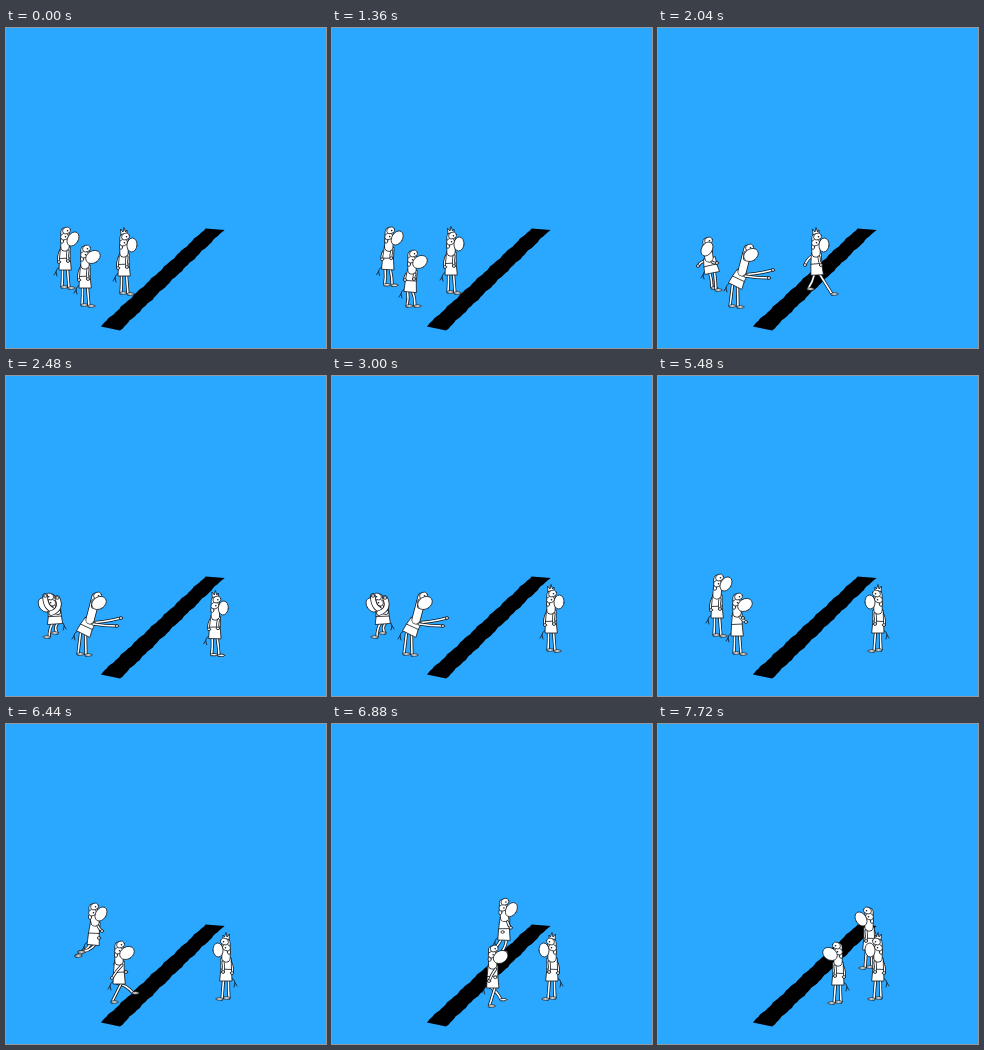
Recreate the animation shown at these times as an HTML page with a canvas. Size 320 by 320 pixels, loop 8 s.

```html
<!DOCTYPE html>
<html lang="en">
<head>
<meta charset="utf-8">
<title>Over the line</title>
<style>
html, body { margin: 0; width: 100%; height: 100%; overflow: hidden; background: #2aa7ff; }
canvas { display: block; width: 100vw; height: 100vh; }
</style>
</head>
<body>
<canvas id="stage"></canvas>
<script>
const LOOP = 8000, STEP = 40, INK = '#101418';
const canvas = document.getElementById('stage');
const ctx = canvas.getContext('2d');

// Joints facing right, relative to the ground point between the feet.
const stand = {
  nose: [8, -49], head: [0, -53], neck: [0, -41], hip: [0, -18],
  foot1: [-3, -1], foot2: [4, 0], hand1: [-6, -26], hand2: [3, -27]
};
const pose = (changes) => ({ ...stand, ...changes });
const POSES = {
  stand,
  fidget: pose({ hand1: [-6, -34] }),
  think: pose({ hand1: [6, -36], hand2: [9, -32] }),
  lookUp: pose({ nose: [9, -52], head: [1, -54] }),
  stepA: pose({ hip: [1, -19], foot1: [-8, -5], foot2: [16, 0], hand1: [-11, -29], hand2: [5, -29] }),
  stepB: pose({ foot1: [14, -9], foot2: [-7, 0], hand1: [7, -30], hand2: [-7, -24] }),
  dip: pose({ nose: [9, -44], head: [1, -48], neck: [1, -36], hip: [-1, -14], foot1: [-4, 0] }),
  lunge: {
    nose: [14, -52], head: [11, -55], neck: [5, -35], hip: [-2, -21],
    foot1: [-7, -1], foot2: [1, 0], hand1: [36, -37], hand2: [32, -29]
  },
  shock: {
    nose: [-1, -39], head: [-1, -43], neck: [1, -30], hip: [4, -15],
    foot1: [4, 0], foot2: [8, 2], hand1: [-10, -22], hand2: [9, -25]
  },
  cower: {
    nose: [8, -32], head: [1, -36], neck: [-2, -28], hip: [-3, -13],
    foot1: [-5, -4], foot2: [3, 0], hand1: [-5, -39], hand2: [7, -41]
  },
  leap: pose({
    nose: [7, -51], head: [-1, -54], neck: [1, -43], hip: [-1, -20],
    foot1: [-18, -9], foot2: [-15, -13], hand1: [5, -27], hand2: [8, -34]
  })
};

// Keys: time, x, ground, facing, pose
const ann = {
  nose: [5.3, 7.6, 0.55], blinks: [[4800, 4880], [5320, 5400]],
  keys: [
    [0, 59, 260, 1, 'stand'], [960, 59, 260, 1, 'stand'],
    [1280, 57, 260, 1, 'dip'], [1480, 55, 253, 1, 'lookUp'],
    [1760, 50, 260, 1, 'shock'], [2080, 50, 260, 1, 'shock'],
    [2240, 47, 261, -1, 'cower'], [2400, 45, 261, -1, 'cower'],
    [2600, 48, 261, -1, 'cower'], [4280, 48, 261, -1, 'cower'],
    [4400, 54, 260, 1, 'dip'], [4560, 59, 260, 1, 'stand'],
    [5160, 59, 260, 1, 'stand'], [5360, 59, 260, 1, 'lookUp'],
    [5640, 59, 260, 1, 'lookUp'], [5840, 59, 260, 1, 'stand'],
    [6000, 59, 260, 1, 'stand'], [6160, 59, 260, 1, 'dip'],
    [6280, 64, 255, 1, 'stand'], [6440, 88, 241, 1, 'leap'],
    [6640, 124, 234, 1, 'leap'], [6800, 156, 233, 1, 'leap'],
    [7000, 196, 240, 1, 'stepA'], [7120, 211, 246, 1, 'dip'],
    [7280, 211, 244, -1, 'stand'], [8000, 211, 244, -1, 'stand']
  ]
};
const ben = {
  nose: [6, 7.8, 1], blinks: [[4800, 4880], [5640, 5720]],
  keys: [
    [0, 79, 278, 1, 'stand'], [1120, 79, 278, 1, 'stand'],
    [1360, 79, 278, 1, 'dip'], [1640, 79, 279, 1, 'lunge'],
    [3440, 79, 279, 1, 'lunge'], [3640, 79, 278, 1, 'dip'],
    [3840, 79, 278, 1, 'stand'], [5160, 79, 278, 1, 'stand'],
    [5360, 79, 278, 1, 'think'], [5640, 79, 278, 1, 'think'],
    [5840, 79, 278, 1, 'stand'], [6080, 79, 278, 1, 'stand'],
    [6200, 90, 277, 1, 'stepA'], [6320, 102, 278, 1, 'stand'],
    [6440, 113, 278, 1, 'stepB'], [6560, 126, 283, 1, 'stand'],
    [6680, 138, 287, 1, 'stepA'], [6800, 152, 284, 1, 'stand'],
    [6920, 165, 281, 1, 'stepB'], [7080, 179, 280, 1, 'dip'],
    [7240, 180, 279, -1, 'stand'], [8000, 180, 279, -1, 'stand']
  ]
};
const cal = {
  nose: [5, 7, 0.1], hair: true, blinks: [[400, 440], [3280, 3360]], lookBack: [280, 680],
  keys: [
    [0, 118, 266, 1, 'stand'], [280, 118, 266, 1, 'stand'],
    [400, 118, 266, 1, 'fidget'], [560, 118, 266, 1, 'fidget'],
    [680, 118, 266, 1, 'stand'], [960, 118, 266, 1, 'stand'],
    [1160, 118, 266, 1, 'dip'], [1360, 119, 265, 1, 'stand'],
    [1560, 127, 264, 1, 'stepB'], [1760, 138, 264, 1, 'stand'],
    [2040, 158, 266, 1, 'stepA'], [2200, 176, 279, 1, 'stand'],
    [2320, 191, 287, 1, 'stepB'], [2440, 205, 281, 1, 'stand'],
    [2560, 217, 276, 1, 'dip'], [2680, 219, 275, 1, 'stand'],
    [3160, 219, 275, 1, 'stand'], [3240, 220, 275, 1, 'dip'],
    [3360, 220, 275, -1, 'stand'], [8000, 220, 275, -1, 'stand']
  ]
};

const mix = (a, b, k) => a + (b - a) * k;
const within = (t, [from, to]) => t >= from && t < to;

function sample(keys, t) {
  let i = 0;
  while (i < keys.length - 2 && t >= keys[i + 1][0]) i++;
  const a = keys[i], b = keys[i + 1];
  const k = (t - a[0]) / (b[0] - a[0]);
  const joints = {};
  for (const name in stand) {
    const p = POSES[a[4]][name], q = POSES[b[4]][name];
    joints[name] = [mix(p[0], q[0], k), mix(p[1], q[1], k)];
  }
  return { x: mix(a[1], b[1], k), y: mix(a[2], b[2], k), dir: a[3], joints };
}

function ink(fill = '#fff', width = 0.8) {
  if (fill) { ctx.fillStyle = fill; ctx.fill(); }
  ctx.strokeStyle = INK;
  ctx.lineWidth = width;
  ctx.stroke();
}
function oval(x, y, rx, ry, tilt = 0) {
  ctx.beginPath();
  ctx.ellipse(x, y, rx, ry, tilt, 0, Math.PI * 2);
  ink();
}
function shape(points, closed = true) {
  ctx.beginPath();
  points.forEach(([x, y]) => ctx.lineTo(x, y));
  if (closed) ctx.closePath();
  ink(closed ? '#fff' : null);
}
function limb(a, b, bend, width) {
  const dx = b[0] - a[0], dy = b[1] - a[1], len = Math.hypot(dx, dy) || 1;
  ctx.beginPath();
  ctx.moveTo(...a);
  ctx.quadraticCurveTo((a[0] + b[0]) / 2 - dy / len * bend, (a[1] + b[1]) / 2 + dx / len * bend, ...b);
  ink(null, width + 1.5);
  ctx.strokeStyle = '#fff';
  ctx.lineWidth = width;
  ctx.stroke();
}

// The shirt spreads when the body folds.
function body({ neck, hip }) {
  const dx = hip[0] - neck[0], dy = hip[1] - neck[1], len = Math.hypot(dx, dy);
  const nx = dy / len, ny = -dx / len, wide = Math.sqrt(23 / len);
  const at = (k, w) => [neck[0] + dx * k + nx * w * wide, neck[1] + dy * k + ny * w * wide];
  shape([at(0, -4.8), at(0, 5.2), at(0.5, 5.2), at(1, 6.3), at(1, -6), at(0.5, -5.5)]);
  shape([at(0.5, -5.5), at(0.48, 5.2)], false);
}

function face({ head, nose, neck }, actor, t) {
  const [x, y] = head;
  const shut = actor.blinks.some(span => within(t, span));
  const look = actor.lookBack && within(t, actor.lookBack) ? -1 : 1;
  if (actor.hair) {
    shape([[x - 3, y - 6], [x - 3.5, y - 12], [x - 1, y - 9], [x, y - 13.5], [x + 1.5, y - 9], [x + 3, y - 11], [x + 3, y - 5]]);
  }
  limb([x, y - 3], neck, 0, 7.5);
  oval(x - 3, y + 6, 1.6, 2.4);
  for (const [ex, ey] of [[x - 0.5, y + 1.5], [x + 1.5, y - 4.5]]) {
    oval(ex, ey, 4, 3.2, -0.3);
    if (shut) {
      shape([[ex - 2.5, ey], [ex + 2.5, ey]], false);
    } else {
      ctx.fillStyle = INK;
      ctx.beginPath();
      ctx.arc(ex + look, ey + 0.3, 0.8, 0, 7);
      ctx.fill();
    }
  }
  oval(...nose, ...actor.nose);
}

function figure(actor, t) {
  const { x, y, dir, joints: j } = sample(actor.keys, t);
  const [hx, hy] = j.hip;
  ctx.save();
  ctx.translate(x, y);
  ctx.scale(dir, 1);

  ctx.beginPath();
  ctx.moveTo(hx - 4, hy - 3);
  ctx.quadraticCurveTo(hx - 8, hy - 3, hx - 9, hy + 2);
  ctx.lineTo(hx - 11, hy + 5);
  ctx.moveTo(hx - 9, hy + 2);
  ctx.lineTo(hx - 8, hy + 6);
  ink(null);

  [[j.foot1, -2.5], [j.foot2, 2.5]].forEach(([foot, side]) => {
    limb([hx + side, hy - 1], foot, -Math.max(0, 18 - Math.abs(foot[1] - hy)) * 0.4, 1.6);
    oval(foot[0] + 2.5, foot[1], 3.6, 1.2);
  });
  const arm1 = [j.neck[0] - 4, j.neck[1] + 3], arm2 = [j.neck[0] + 3, j.neck[1] + 4];
  const raised = j.hand2[1] < j.neck[1] - 4;
  if (!raised) limb(arm1, j.hand1, 2, 1.6);
  body(j);
  face(j, actor, t);
  if (raised) {
    limb(arm1, j.hand2, 9, 4);
    limb(arm2, j.hand1, -9, 4);
  } else {
    limb(arm2, j.hand2, 1, 1.4);
  }
  oval(...j.hand1, 1.7, 1.3);
  oval(...j.hand2, 1.7, 1.3);
  ctx.restore();
}

function bar() {
  const rough = (k) => Math.sin(k * 47) * 0.5 + Math.sin(k * 111) * 0.4;
  const edge = (x1, y1, x2, y2) => {
    for (let k = 0; k <= 1; k += 0.02) ctx.lineTo(mix(x1, x2, k) + rough(k), mix(y1, y2, k));
  };
  ctx.fillStyle = '#000';
  ctx.beginPath();
  edge(199.5, 200.5, 92, 300.5);
  edge(114, 302.5, 220, 200);
  ctx.fill();
}

function draw(now) {
  const t = Math.floor((now % LOOP) / STEP) * STEP;
  const ratio = window.devicePixelRatio || 1;
  const w = Math.round(innerWidth * ratio), h = Math.round(innerHeight * ratio);
  if (canvas.width !== w || canvas.height !== h) {
    canvas.width = w;
    canvas.height = h;
  }
  ctx.setTransform(w / 320, 0, 0, h / 320, 0, 0);
  ctx.lineJoin = ctx.lineCap = 'round';
  ctx.fillStyle = '#2aa7ff';
  ctx.fillRect(0, 0, 320, 320);
  bar();
  [ann, cal, ben].forEach(actor => figure(actor, t));
}

const start = performance.now();
function tick() {
  draw(performance.now() - start);
  requestAnimationFrame(tick);
}
tick();
</script>
</body>
</html>
```
